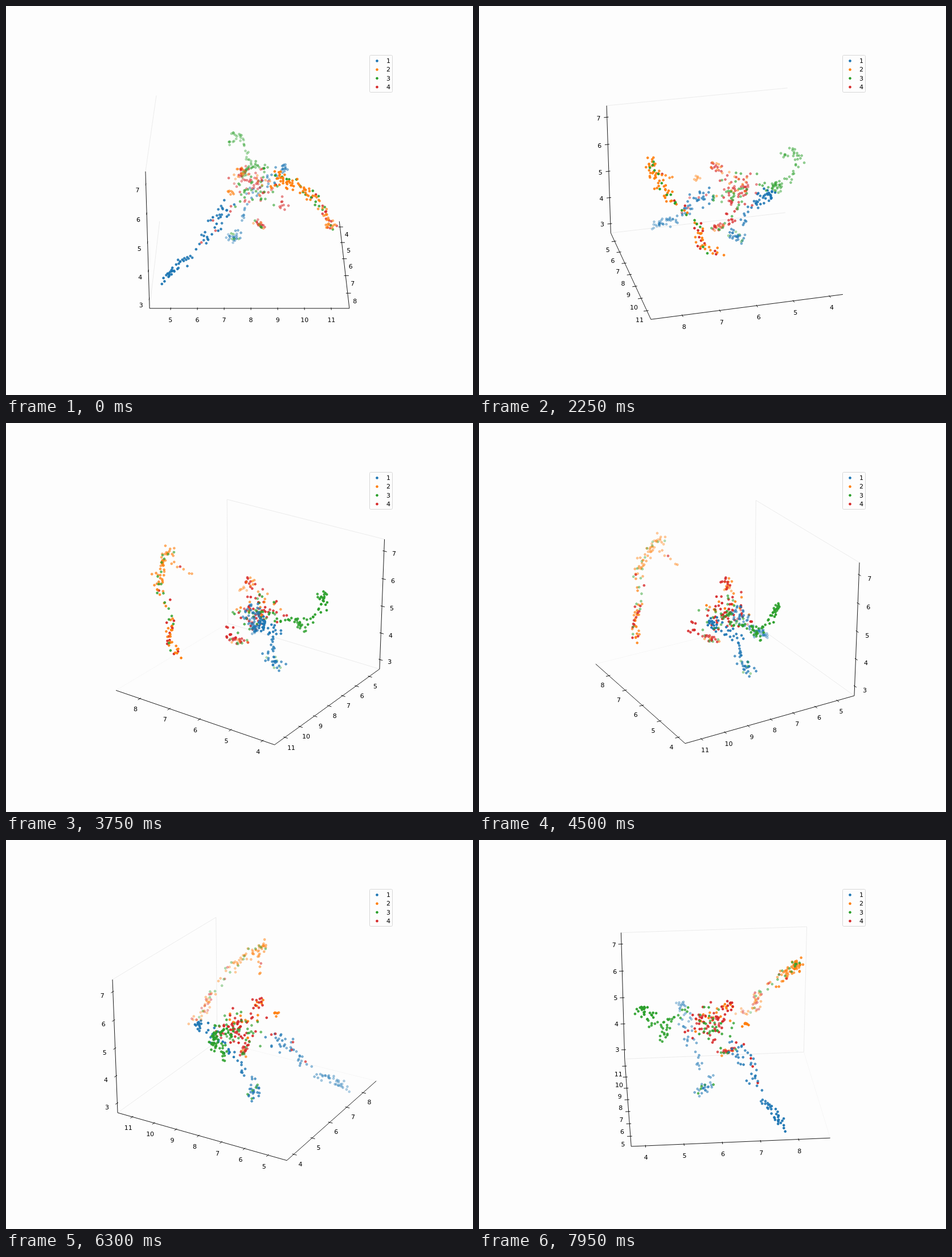
Recreate the animation shown at these times as an HTML page. Size 820 by 683 pixels, loop 8 s.

```html
<!DOCTYPE html>
<html lang="en">
<head>
<meta charset="utf-8">
<title>Rotating 3D scatter</title>
<style>
  html, body { margin: 0; width: 100%; height: 100%; overflow: hidden; background: #fdfdfd; }
  svg { display: block; width: 820px; height: 683px; }
  text { font: 11px "DejaVu Sans", sans-serif; fill: #000; text-anchor: middle; }
</style>
</head>
<body>
<svg id="stage" viewBox="0 0 820 683"></svg>
<script>
const LOOP = 8000, STEP = 150, TURN = 5;
const COLORS = { blue: '#1f77b4', orange: '#ff7f0e', green: '#2ca02c', red: '#d62728' };

const stage = document.getElementById('stage');
function make(tag, attrs = {}, parent = stage) {
  const el = document.createElementNS('http://www.w3.org/2000/svg', tag);
  set(el, attrs);
  parent.appendChild(el);
  return el;
}
function set(el, attrs) {
  for (const k in attrs) el.setAttribute(k, attrs[k]);
}

let seed = 20117;
function rand() {
  seed = (seed * 1664525 + 1013904223) >>> 0;
  return seed / 4294967296;
}
const noise = () => (rand() + rand() + rand() - 1.5) * 2;

// Scatter coloured points around a path; key points in hundredths of a box unit
const clouds = { blue: [], orange: [], green: [], red: [] };
function strand(spread, mix, ...path) {
  const last = path.length - 1;
  for (const color in mix) {
    for (let i = 0; i < mix[color]; i++) {
      const u = last * (i + rand()) / mix[color];
      const k = Math.floor(u);
      const to = path[Math.min(k + 1, last)];
      clouds[color].push(path[k].map((v, c) =>
        (v + (to[c] - v) * (u - k) + noise() * spread) / 100));
    }
  }
}

// Blue tail, knot, foot and wing
strand(1.4, { blue: 33 }, [-50, 31, -37], [-43, 27, -33], [-35, 20, -28]);
strand(2.6, { blue: 34, red: 5 }, [-28, 17, -21], [-19, 13, -9], [-11, 5, -3]);
strand(1.6, { blue: 22, green: 5 }, [-11, -16, -35], [-8, -6, -27]);
strand(1.2, { blue: 8 }, [-5, -14, -22], [-2, -15, -10]);
strand(1.1, { blue: 12 }, [21, -23, 9.5]);
strand(2.6, { blue: 22 }, [17, -21, 8], [0, -18, -8]);

// Orange hook, its branch and its end
strand(1.6, { orange: 44, green: 9 }, [15, 46, 37], [24, 47, 30], [36, 39, 20]);
strand(0.5, { orange: 6, red: 1 }, [19, 45, 31], [11, 31, 21]);
strand(1.4, { orange: 4, green: 6, red: 3 }, [36, 39, 20], [42, 26, 5]);
strand(1.3, { orange: 20, red: 10, green: 3 }, [42, 24, 6], [46, 26, -5], [50, 14, -10]);

// Green arch and its side arm
strand(1.2, { green: 48 }, [-13, -40, 17], [-10, -48, 22], [-4, -49, 17], [-1, -42, 8], [4, -31, 6], [12, -21, 11]);
strand(1.3, { green: 14 }, [-4, -36, -1], [-1, -33, 4]);

// Mixed centre
strand(5.5, { red: 48, green: 30, orange: 13 }, [-2, -9, 9], [6, -7, 2]);
strand(1.7, { red: 10, orange: 6 }, [-5, 3, 19]);
strand(1.3, { orange: 7 }, [-10, 13, 10]);
strand(2, { red: 9 }, [19, 0, -4]);
strand(1.1, { red: 14, green: 5, orange: 4 }, [4, 0, -15], [8, 8, -16]);

// Axes: data limits, half length of the box side, labelled ticks
const AXES = [
  { lo: 4.21, hi: 11.68, half: 0.5714, first: 5, last: 11 },
  { lo: 3.63, hi: 8.83, half: 0.5714, first: 4, last: 8 },
  { lo: 2.64, hi: 7.42, half: 0.4286, first: 3, last: 7 }
];
const HALF = AXES.map(a => a.half);
const RAD = Math.PI / 180;
const SIN_E = Math.sin(25 * RAD), COS_E = Math.cos(25 * RAD);
const DIST = 9.6, ZOOM = 2844, CX = 427.5, CY = 337.5;

// The second axis runs towards the viewer at the start
function camera(deg) {
  const s = Math.sin(deg * RAD), c = Math.cos(deg * RAD);
  return ([x, y, z]) => {
    const right = -s * x - c * y, front = c * x - s * y;
    const depth = DIST - (front * COS_E + z * SIN_E);
    const k = ZOOM / depth;
    return { x: CX + right * k, y: CY - (z * COS_E - front * SIN_E) * k, depth };
  };
}

const paneGroup = make('g', { 'stroke-width': 0.9 });
const edges = ['#e9e9e9', '#e9e9e9', '#e9e9e9', '#f5f5f5'].map(stroke => make('line', { stroke }, paneGroup));
const axisGroup = make('g', { stroke: '#000', 'stroke-width': 0.9 });
const labelGroup = make('g');
for (const axis of AXES) {
  axis.line = make('line', {}, axisGroup);
  axis.ticks = [];
  for (let v = axis.first; v <= axis.last; v++) {
    const label = make('text', {}, labelGroup);
    label.textContent = v;
    axis.ticks.push({
      at: ((v - axis.lo) / (axis.hi - axis.lo) * 2 - 1) * axis.half,
      mark: make('line', {}, axisGroup),
      label
    });
  }
}

const dotGroup = make('g', { 'stroke-width': 0.9 });
const dots = Object.values(clouds).flat().map(() => make('circle', { r: 1.9 }, dotGroup));

make('rect', { x: 638.5, y: 86.5, width: 40, height: 65, rx: 2, fill: '#fdfdfd', stroke: '#d3d3d3', 'stroke-width': 0.9 });
Object.values(COLORS).forEach((color, i) => {
  const y = 96.4 + i * 15.3;
  make('circle', { cx: 651.5, cy: y, r: 1.9, fill: color, stroke: color, 'stroke-width': 0.9 });
  make('text', { x: 671.5, y: y + 3.6 }).textContent = i + 1;
});

function join(el, p, q) {
  set(el, { x1: p.x.toFixed(2), y1: p.y.toFixed(2), x2: q.x.toFixed(2), y2: q.y.toFixed(2) });
}

function drawAxes(view, deg) {
  const backX = Math.cos(deg * RAD) > 0 ? -1 : 1;
  const nearY = Math.sin(deg * RAD) > 0 ? -1 : 1;
  const corner = (x, y, z) => view([x * HALF[0], y * HALF[1], z * HALF[2]]);

  join(edges[0], corner(backX, -1, 1), corner(backX, 1, 1));
  join(edges[1], corner(backX, -1, -1), corner(backX, 1, -1));
  join(edges[2], corner(backX, -nearY, -1), corner(backX, -nearY, 1));
  join(edges[3], corner(-1, -nearY, -1), corner(1, -nearY, -1));
  edges[2].style.display = edges[3].style.display = nearY < 0 ? '' : 'none';

  const sides = [[0, nearY, -1], [-backX, 0, -1], [backX, nearY, 0]];
  AXES.forEach((axis, i) => {
    const tickDir = i === 1 ? 0 : 1;
    // Point on the axis, pushed outwards along some box directions
    const place = (at, factor, dirs) => view(sides[i].map((s, c) =>
      c === i ? at : s * HALF[c] * (dirs.includes(c) ? factor : 1)));
    join(axis.line, place(-axis.half, 1, []), place(axis.half, 1, []));
    for (const t of axis.ticks) {
      join(t.mark, place(t.at, 1.0333, [tickDir]), place(t.at, 0.9833, [tickDir]));
      const p = place(t.at, 1.076, [0, 1, 2]);
      set(t.label, { x: p.x.toFixed(2), y: (p.y + 9).toFixed(2) });
    }
  });
}

// Far points fade, separately for each colour
function drawDots(view) {
  const layers = Object.entries(clouds).map(([name, cloud]) => {
    const pts = cloud.map(view).sort((p, q) => q.depth - p.depth);
    return { color: COLORS[name], pts, far: pts[0].depth, near: pts[pts.length - 1].depth };
  }).sort((p, q) => q.near - p.near);
  let i = 0;
  for (const { color, pts, far, near } of layers) {
    for (const p of pts) {
      const alpha = (1 - 0.7 * (p.depth - near) / (far - near)).toFixed(3);
      set(dots[i++], {
        cx: p.x.toFixed(2), cy: p.y.toFixed(2), fill: color, stroke: color,
        'fill-opacity': alpha, 'stroke-opacity': alpha
      });
    }
  }
}

let shown = -1;
function render(ms) {
  const step = Math.floor(ms % LOOP / STEP);
  if (step === shown) return;
  shown = step;
  const deg = -90 + TURN * step;
  const view = camera(deg);
  drawAxes(view, deg);
  drawDots(view);
}

const start = performance.now();
function tick() {
  render(performance.now() - start);
  requestAnimationFrame(tick);
}
render(0);
requestAnimationFrame(tick);
</script>
</body>
</html>
```
